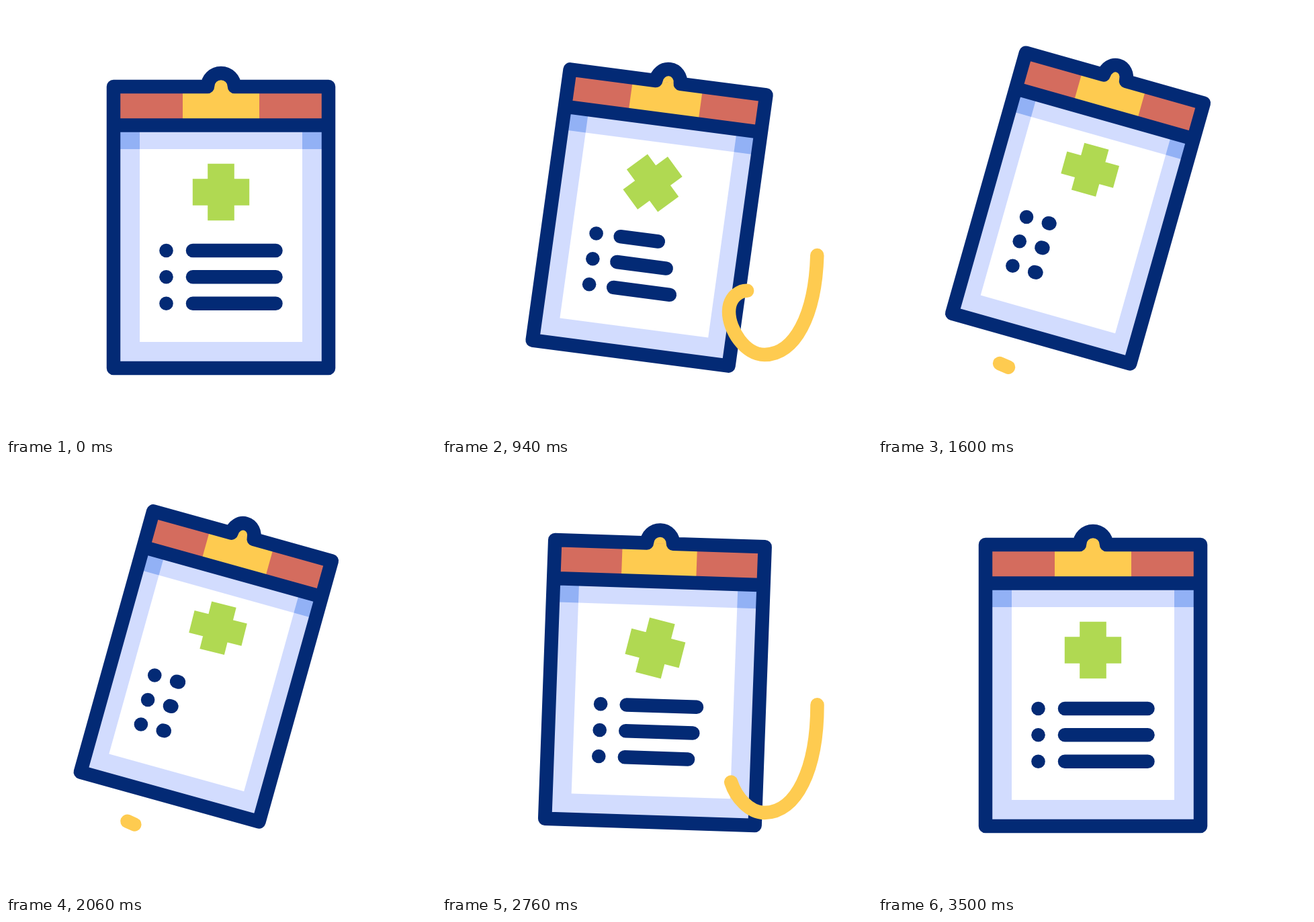
Recreate the animation shown at these times as an HTML page with a canvas. Size 640x640 px, loop 3.6 s.

```html
<!DOCTYPE html>
<html lang="en">
<head>
<meta charset="utf-8">
<title>Medical clipboard</title>
<style>
  html, body { margin: 0; width: 100%; height: 100%; overflow: hidden; background: #fff; }
  canvas { display: block; width: 640px; height: 640px; }
</style>
</head>
<body>
<canvas></canvas>
<script>
const LOOP = 3600, STEP = 20;
const SWING = 1520;              // length of one swing
const OUT = 178, BACK = 1818;    // start of each swing
const LINE_LAG = 40, TAIL_LAG = 167;

const NAVY = '#032a75', RED = '#d46c5e', YELLOW = '#fecb50', PALE = '#d2dcfe',
      BLUE = '#92b1f5', GREEN = '#b0d952', WHITE = '#fff';

// affine pose of the board at full tilt: a, b, c, d, e, f
const REST = [1, 0, 0, 1, 0, 0];
const TILT = [0.8275, 0.2344, -0.2625, 0.9255, 119.2, -78.96];

const CORD = 'M547 237C553 270 558.5 315 558.5 358C558.5 455 527 519 480 519' +
  'C451 519 427 482 427 455C427 440 434 430 446 425C460 420 486 430 486 465' +
  'C486 535 430 581 365 581C315 581 262 566 215 547L180 531.5';
const cord = new Path2D(CORD);
const probe = document.createElementNS('http://www.w3.org/2000/svg', 'path');
probe.setAttribute('d', CORD);
const cordLength = probe.getTotalLength();

const canvas = document.querySelector('canvas');
const ctx = canvas.getContext('2d');
const ratio = window.devicePixelRatio || 1;
canvas.width = canvas.height = 640 * ratio;

// cubic-bezier(.85, 0, .15, 1)
function ease(x) {
  if (x <= 0) return 0;
  if (x >= 1) return 1;
  let lo = 0, hi = 1;
  for (let i = 0; i < 32; i++) {
    const s = (lo + hi) / 2, r = 1 - s;
    if (2.55 * s * r * r + 0.45 * s * s * r + s * s * s < x) lo = s; else hi = s;
  }
  return lo * lo * (3 - 2 * lo);
}

// out and back again, each way with its own delay
const swing = (t, lagOut = 0, lagBack = lagOut) =>
  ease((t - OUT - lagOut) / SWING) - ease((t - BACK - lagBack) / SWING);

const base = () => ctx.setTransform(ratio, 0, 0, ratio, 0, 0);

function fillRect(pose, color, x, y, w, h) {
  base();
  ctx.transform(...pose);
  ctx.fillStyle = color;
  ctx.fillRect(x, y, w, h);
}

// the pose bends the path, the stroke keeps its width
function trace(pose, build) {
  base();
  ctx.transform(...pose);
  ctx.beginPath();
  build();
  base();
}

function stroke(pose, width, build) {
  trace(pose, build);
  ctx.strokeStyle = NAVY;
  ctx.lineWidth = width;
  ctx.stroke();
}

function knob() {
  ctx.moveTo(160, 120);
  ctx.lineTo(300, 120);
  ctx.arc(320, 120, 20, Math.PI, 0);
  ctx.lineTo(480, 120);
}

function drawBoard(pose) {
  const rect = (...args) => fillRect(pose, ...args);
  rect(PALE, 160, 177, 320, 362);
  rect(BLUE, 160, 177, 39, 36);
  rect(BLUE, 441, 177, 39, 36);
  rect(WHITE, 199, 213, 242, 287);
  rect(RED, 160, 120, 320, 57);
  rect(YELLOW, 263, 120, 114, 57);

  trace(pose, () => ctx.arc(320, 120, 20, Math.PI, 0));
  ctx.fillStyle = YELLOW;
  ctx.fill();

  stroke(pose, 20.5, () => {
    knob();
    ctx.lineTo(480, 539);
    ctx.lineTo(160, 539);
    ctx.closePath();
    ctx.moveTo(160, 177.5);
    ctx.lineTo(480, 177.5);
  });
}

function drawCross(p) {
  base();
  ctx.translate(320 - 21.3 * p + 17 * p * p, 277 - 19.4 * p - 14 * p * p);
  ctx.rotate(105.7 * p * Math.PI / 180);
  ctx.scale(1 - 0.141 * p, 1 - 0.045 * p);
  ctx.fillStyle = GREEN;
  ctx.beginPath();
  ctx.rect(-42.2, -19.7, 84.4, 39.4);
  ctx.rect(-19.8, -42.2, 39.6, 84.4);
  ctx.fill();
}

function drawList(t, pose) {
  [364, 403.3, 442.7].forEach((y, i) => {
    const [a, b, c, d, e, f] = pose;
    base();
    ctx.fillStyle = NAVY;
    ctx.beginPath();
    ctx.arc(a * 238.5 + c * y + e, b * 238.5 + d * y + f, 10.3, 0, 2 * Math.PI);
    ctx.fill();

    const left = 1 - 0.985 * swing(t, i * LINE_LAG);
    stroke(pose, 20.5, () => {
      ctx.moveTo(278, y);
      ctx.lineTo(278 + 123.5 * left, y);
    });
  });
}

function drawCord(t) {
  const head = swing(t, 0, TAIL_LAG), tail = swing(t, TAIL_LAG, 0);
  if (head - tail < 0.0005) return;
  base();
  ctx.setLineDash([(head - tail) * cordLength, 9999]);
  ctx.lineDashOffset = -tail * cordLength;
  ctx.strokeStyle = YELLOW;
  ctx.lineWidth = 20.5;
  ctx.stroke(cord);
  ctx.setLineDash([]);
}

function draw(t) {
  const p = swing(t);
  const pose = REST.map((v, i) => v + (TILT[i] - v) * p);
  base();
  ctx.fillStyle = WHITE;
  ctx.fillRect(0, 0, 640, 640);
  ctx.lineCap = ctx.lineJoin = 'round';
  drawBoard(pose);
  drawCross(p);
  drawList(t, pose);
  drawCord(t);
}

const start = performance.now();
function tick() {
  const t = (performance.now() - start) % LOOP;
  draw(Math.floor(t / STEP) * STEP);
  requestAnimationFrame(tick);
}
tick();
</script>
</body>
</html>
```
